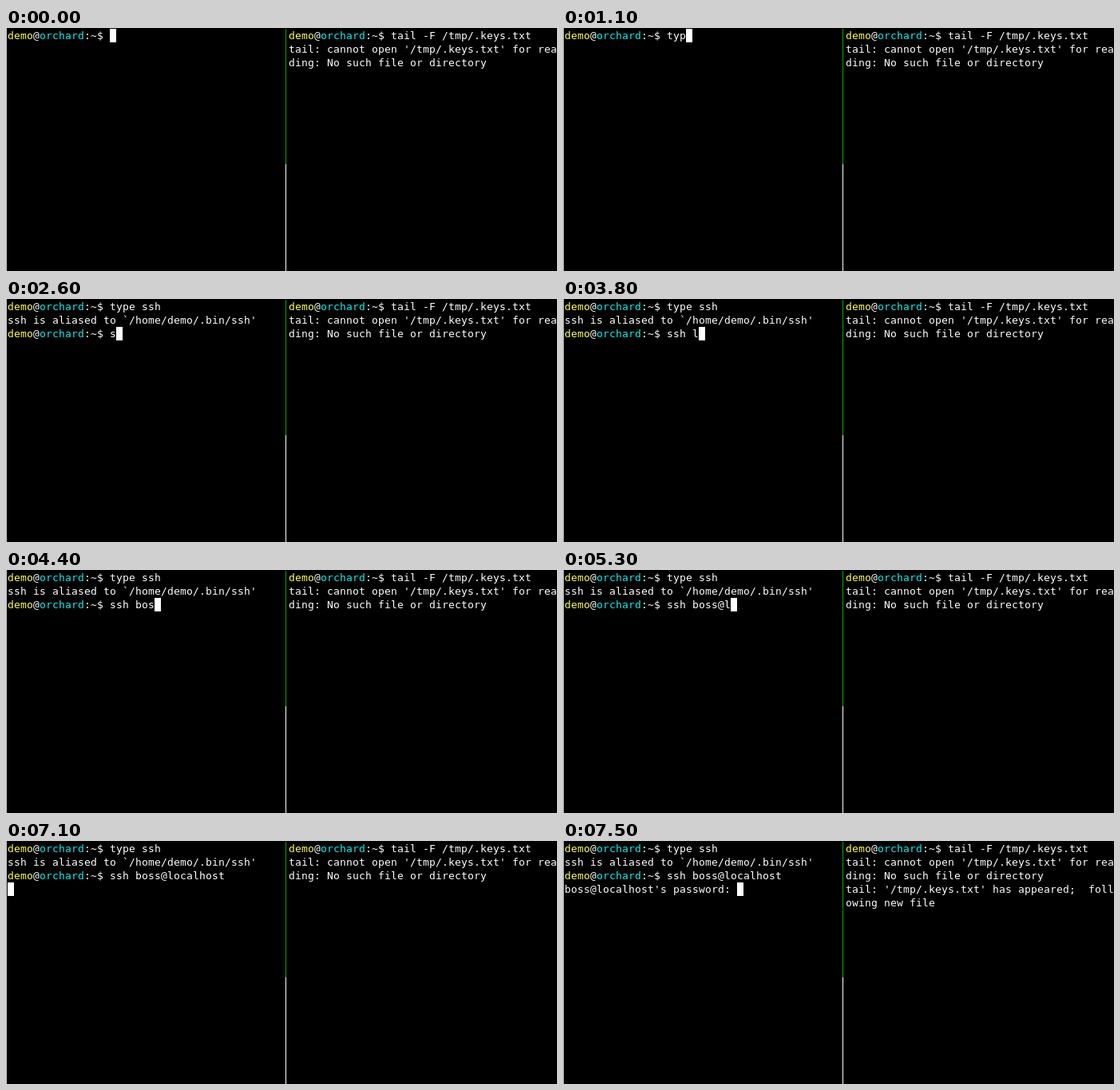
These frames come from a looping animation (690x305 px, 8000 ms). An HTML page with a canvas:

```html
<!DOCTYPE html>
<html lang="en">
<head>
<meta charset="utf-8">
<title>Split terminal</title>
<style>
html, body { margin: 0; height: 100%; overflow: hidden; background: #000; }
canvas { display: block; }
</style>
</head>
<body>
<canvas id="screen" width="690" height="305"></canvas>
<script>
const ctx = document.getElementById('screen').getContext('2d');
const LOOP = 8000, CELL_W = 8, CELL_H = 17, LEFT = 2, TOP = 1, RIGHT_PANE = 44;
const USER = 'demo', HOST = 'orchard', LOGIN = 'boss@localhost';
const PROMPT_LENGTH = `${USER}@${HOST}:~$ `.length;

// [time, keys]; '<' is a backspace
const firstCommand = [
  [600, 't'], [1000, 'y'], [1100, 'p'], [1200, 'e'], [1400, ' '],
  [1500, 's'], [1700, 's'], [1800, 'h'],
];
const secondCommand = [
  [2600, 's'], [2700, 's'], [2800, 'h'], [3000, ' '], [3800, 'l'], [4100, '<'],
  [4200, 'b'], [4300, 'o'], [4400, 's'], [4500, 's'], [4900, '@'],
  [5300, 'l'], [5400, 'o'], [5500, 'ca'], [5800, 'h'], [6000, '<'], [6200, 'lh'],
  [6600, 'o'], [6700, 's'], [6800, 't'],
];

function typed(keys, time) {
  let line = '';
  for (const [at, key] of keys) {
    if (at <= time) line = key === '<' ? line.slice(0, -1) : line + key;
  }
  return line;
}

function rect(x, y, w, h, color) {
  ctx.fillStyle = color;
  ctx.fillRect(x, y, w, h);
}

// Every character sits in its own terminal cell
function print(text, col, row, color = '#fff') {
  ctx.fillStyle = color;
  [...text].forEach((ch, i) =>
    ctx.fillText(ch, LEFT + (col + i) * CELL_W, TOP + row * CELL_H + 13));
}

function shellLine(command, col, row) {
  print(USER, col, row, '#ffff55');
  print('@', col + USER.length, row);
  print(HOST, col + USER.length + 1, row, '#11eeee');
  print(':~$ ' + command, col + PROMPT_LENGTH - 4, row);
}

function cursor(col, row) {
  rect(LEFT + col * CELL_W, TOP + row * CELL_H, CELL_W, CELL_H, '#fff');
}

function leftPane(time) {
  const first = typed(firstCommand, time), second = typed(secondCommand, time);
  shellLine(first, 0, 0);
  if (time < 2000) return cursor(PROMPT_LENGTH + first.length, 0);

  print(`ssh is aliased to \`/home/${USER}/.bin/ssh'`, 0, 1);
  shellLine(second, 0, 2);
  if (time < 7100) return cursor(PROMPT_LENGTH + second.length, 2);

  const question = time < 7200 ? '' : `${LOGIN}'s password: `;
  print(question, 0, 3);
  cursor(question.length, 3);
}

function rightPane(time) {
  shellLine('tail -F /tmp/.keys.txt', RIGHT_PANE, 0);
  const output = [
    "tail: cannot open '/tmp/.keys.txt' for rea",
    'ding: No such file or directory',
  ];
  if (time >= 7500) {
    output.push("tail: '/tmp/.keys.txt' has appeared;  foll", 'owing new file');
  }
  output.forEach((line, i) => print(line, RIGHT_PANE, i + 1));
}

function draw(now) {
  const time = now % LOOP;
  rect(0, 0, 690, 305, '#000');
  rect(0, 0, 1, 305, '#ccc');
  rect(350, 1, 1, 170, '#00aa00');
  rect(350, 171, 1, 134, '#fff');
  ctx.font = '13px "DejaVu Sans Mono", monospace';
  leftPane(time);
  rightPane(time);
  requestAnimationFrame(draw);
}
requestAnimationFrame(draw);
</script>
</body>
</html>
```
